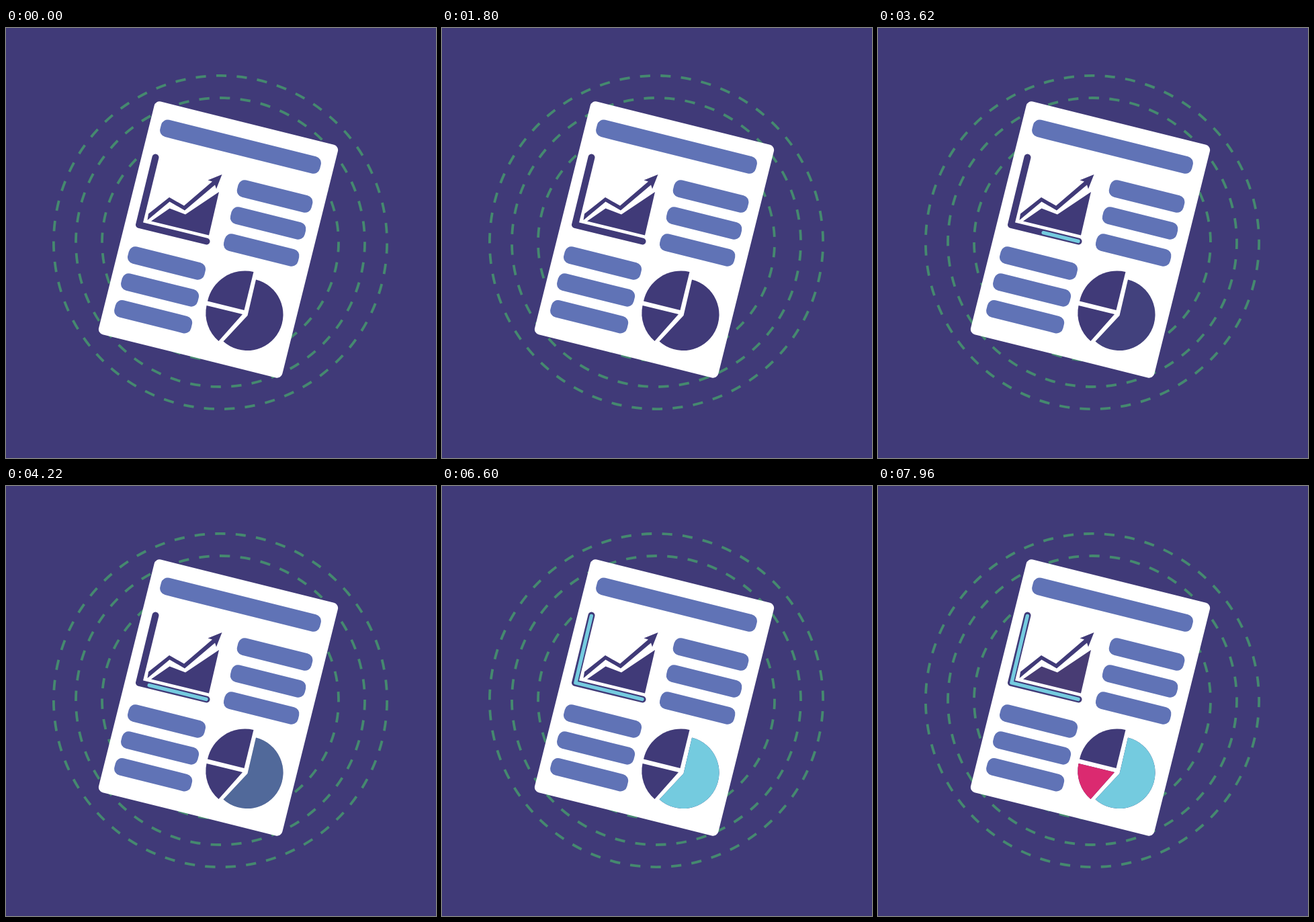
An HTML page for the animation above (8000 ms loop, 640 by 640 pixels).

```html
<!DOCTYPE html>
<html lang="en">
<head>
<meta charset="utf-8">
<title>Report</title>
<style>
  html, body { margin: 0; width: 100%; height: 100%; overflow: hidden; background: #403a78; }
  svg { display: block; width: 100vw; height: 100vh; }
  .ring { fill: none; stroke: #45896f; stroke-width: 3.8; }
  .bar { fill: #6073b6; }
  .ink { fill: #403a78; }
  .axis { fill: none; stroke-linecap: round; stroke-linejoin: round; }
</style>
</head>
<body>
<svg viewBox="0 0 640 640">
  <g id="rings"></g>
  <g id="page" transform="translate(316 315) rotate(14)">
    <rect x="-140.8" y="-178.6" width="281.6" height="357.2" rx="8" fill="#fff"/>
  </g>

  <path class="axis" d="M298.5 317.5L198 293L222.5 192.5" stroke="#403a78" stroke-width="10"/>
  <path id="trace" class="axis" d="M298 317.4L198.8 293L222.3 193.5" pathLength="207" stroke="#74cbdf" stroke-width="5.4"/>

  <path class="ink" d="M212 276.5L243 252L265 264.5L307 228.5L300.5 226.5L321.5 218L313 239.5L311 233.5L266 271.5L243.5 258.5L210.5 286Z"/>
  <path id="area" d="M216 287.5L243.5 268.5L267 277.5L317 244L302 308.5Z"/>

  <path class="ink" d="M354.5 420L300 406.5A57 57 0 0 1 368.5 363Z"/>
  <path class="ink" d="M352 426L316.5 466A55 55 0 0 1 298.5 413Z"/>
  <path id="pink" fill="#db2a70" d="M352 426L316.5 466A55 55 0 0 1 298.5 413Z"/>
  <path class="ink" d="M359.5 428L372 374.6A53.5 53.5 0 1 1 323.5 466.5Z"/>
  <path id="cyan" fill="#74cbdf" d="M359.5 428L372 374.6A53.5 53.5 0 1 1 323.5 466.5Z"/>
</svg>
<script>
  const LOOP = 8000;
  const $ = id => document.getElementById(id);

  function add(parent, tag, attrs) {
    const el = document.createElementNS('http://www.w3.org/2000/svg', tag);
    for (const key in attrs) el.setAttribute(key, attrs[key]);
    return parent.appendChild(el);
  }

  // Dashed rings: radius, dash count, start angle, degrees per second
  const rings = [
    [248.1, 51, 0.35, 1.58],
    [215, 44, 1.8, 1.93],
    [176, 36, 2.2, 1.45]
  ].map(([r, count, start, speed]) => ({
    start, speed,
    el: add($('rings'), 'circle', {
      class: 'ring', cx: 319, cy: 319, r,
      pathLength: count * 2, 'stroke-dasharray': '1 1', 'stroke-dashoffset': 0.5
    })
  }));

  // Text bars: centre x, centre y, width
  const bars = [[-1.4, -142.2, 245]];
  for (let i = 0; i < 3; i++) {
    bars.push([66, -82.9 + i * 41.2, 114], [-66.2, 52.6 + i * 41.1, 117.5]);
  }
  for (const [x, y, w] of bars) {
    add($('page'), 'rect', { class: 'bar', x: x - w / 2, y: y - 13, width: w, height: 26, rx: 10 });
  }

  // Linear interpolation through [time, value] points
  function track(points, t) {
    if (t <= points[0][0]) return points[0][1];
    for (let i = 1; i < points.length; i++) {
      const [t0, v0] = points[i - 1], [t1, v1] = points[i];
      if (t <= t1) return v0 + (v1 - v0) * (t - t0) / (t1 - t0);
    }
    return points[points.length - 1][1];
  }

  const TRACE = [[2680, 0], [2920, 14], [4220, 88.5], [5480, 167], [6140, 207]];
  const CYAN = [[3520, 0], [4220, 0.325], [5480, 0.91], [5690, 1]];
  const PINK = [[6640, 0], [7960, 1]];
  const AREA = [[7800, 0], [7960, 1]];

  // The picture holds between uneven ticks
  const TICKS = [0, 140, 180, 320, 440], CYCLE = 560, LEAD = 120;
  function hold(t) {
    if (t < LEAD) return 0;
    const into = (t - LEAD) % CYCLE;
    return t - into + TICKS.filter(tick => tick <= into).pop();
  }

  function draw(t) {
    for (const { el, start, speed } of rings) {
      el.setAttribute('transform', `rotate(${start + speed * t / 1000 - 90} 319 319)`);
    }
    const length = track(TRACE, t);
    $('trace').style.visibility = length > 0 ? 'visible' : 'hidden';
    $('trace').setAttribute('stroke-dasharray', `${length} 500`);
    $('cyan').setAttribute('opacity', track(CYAN, t));
    $('pink').setAttribute('opacity', track(PINK, t));
    const warm = track(AREA, t);
    $('area').setAttribute('fill', `rgb(${64 + 8 * warm}, ${58 + 2 * warm}, ${120 - 4 * warm})`);
  }

  const begin = performance.now();
  function frame() {
    draw(hold((performance.now() - begin) % LOOP));
    requestAnimationFrame(frame);
  }
  frame();
</script>
</body>
</html>
```
